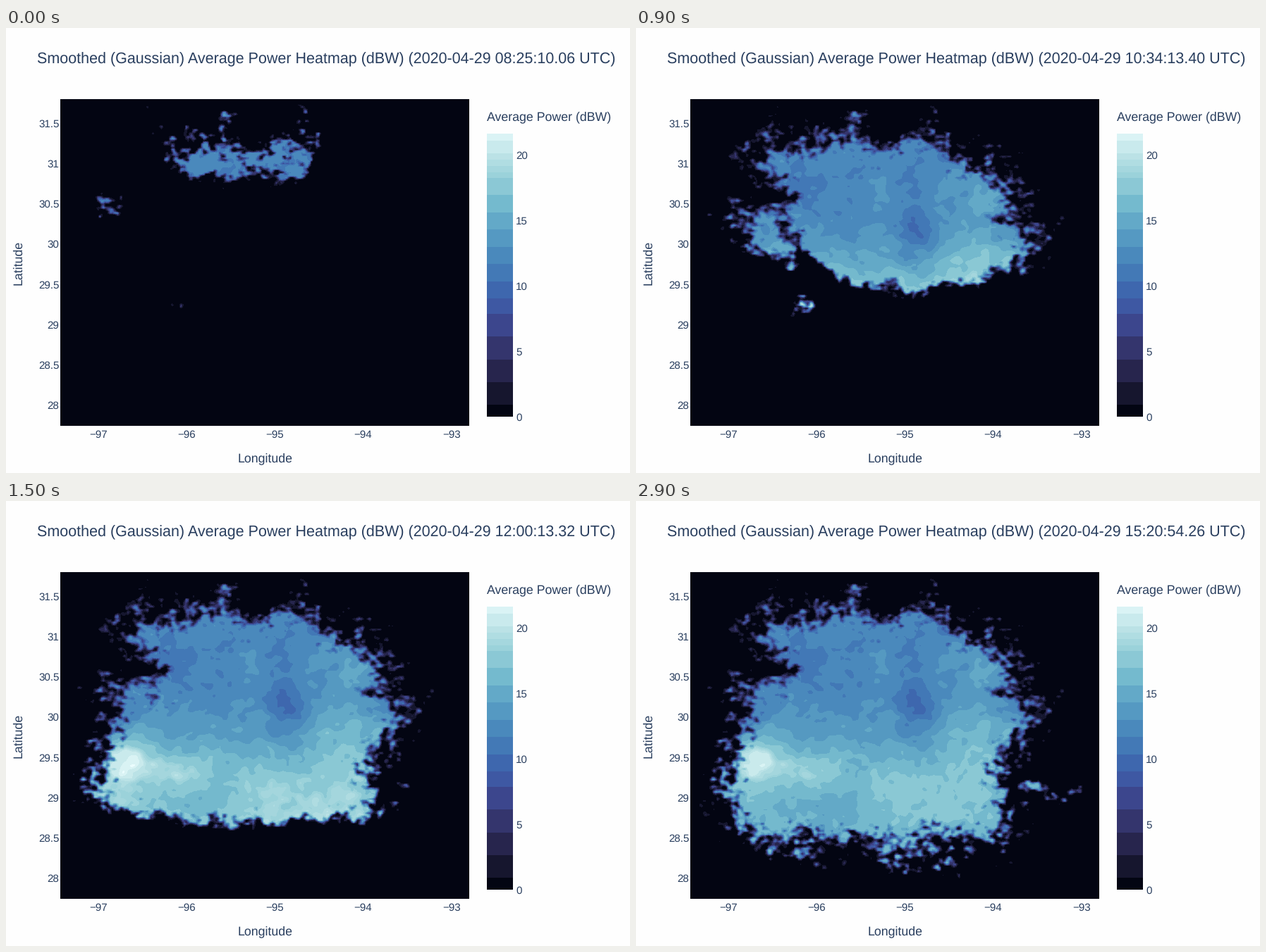
These frames come from a looping animation (885x632 px, 3 s). A matplotlib script:

```python
import numpy as np
import matplotlib.pyplot as plt
from matplotlib.animation import FuncAnimation
from matplotlib.colors import BoundaryNorm, LinearSegmentedColormap, ListedColormap
from matplotlib.path import Path

W, H, DPI = 885, 632, 100
FRAMES, INTERVAL = 30, 100
LEFT, RIGHT, TOP, BOTTOM = 77, 657, 101, 565
NX, NY = 232, 185
INK = "#2a3f5f"

plt.rcParams["font.family"] = "Liberation Sans"
plt.rcParams["text.hinting"] = "none"
rng = np.random.default_rng(29)

x, y = np.meshgrid(
    LEFT + (np.arange(NX) + 0.5) * (RIGHT - LEFT) / NX,
    TOP + (np.arange(NY) + 0.5) * (BOTTOM - TOP) / NY,
)


def noise(sx, sy):
    """Gaussian-smoothed white noise with unit deviation."""
    fx, fy = np.meshgrid(np.fft.fftfreq(NX), np.fft.fftfreq(NY))
    kernel = np.exp(-2 * np.pi**2 * ((sx * fx) ** 2 + (sy * fy) ** 2))
    n = np.fft.ifft2(np.fft.fft2(rng.normal(size=(NY, NX))) * kernel).real
    return n / n.std()


def radius2(cx, cy, rx, ry, turn=0):
    """Squared distance from an ellipse centre, 1 on its rim."""
    c, s = np.cos(np.radians(turn)), np.sin(np.radians(turn))
    u, v = (x - cx) * c + (y - cy) * s, (y - cy) * c - (x - cx) * s
    return (u / rx) ** 2 + (v / ry) ** 2


def smoothstep(v):
    v = np.clip(v, 0, 1)
    return v * v * (3 - 2 * v)


def ramp(step, start, end):
    return np.clip((step - start) / (end - start), 0, 1)


def signed_distance(points):
    """Distance to a closed outline in pixels, positive inside."""
    pts = np.array(points, float)
    best = np.full(x.shape, 1e9)
    for (px, py), (qx, qy) in zip(pts, np.roll(pts, -1, axis=0)):
        dx, dy = qx - px, qy - py
        s = np.clip(((x - px) * dx + (y - py) * dy) / (dx * dx + dy * dy), 0, 1)
        best = np.minimum(best, np.hypot(x - px - s * dx, y - py - s * dy))
    inside = Path(pts).contains_points(np.c_[x.ravel(), y.ravel()])
    return np.where(inside.reshape(x.shape), best, -best)


# Extent of the storm once it has fully passed
OUTLINE = [
    (165, 168), (188, 150), (212, 168), (242, 160), (298, 132), (345, 160),
    (405, 150), (455, 178), (505, 196), (535, 222), (528, 260), (558, 285),
    (550, 325), (522, 375), (522, 460), (490, 490), (375, 508), (310, 486),
    (180, 493), (145, 470), (122, 385), (150, 310), (138, 280), (205, 236),
]
outline = signed_distance(OUTLINE)
outline *= np.where(outline < 0, 0.3, 0.5)

# Detached cells: centre, radii, first step, strength
CELLS = [
    (150, 250, 34, 16, 0, -4), (205, 267, 33, 12, 2, 7),
    (176, 313, 17, 11, 2, 7), (235, 390, 20, 17, 10, 15),
    (550, 405, 26, 12, 25, 2), (612, 418, 38, 14, 25, -4),
]

# Gaps: centre, radii, turn, depth, step when filled (None stays open)
GAPS = [
    (247, 340, 58, 17, 58, 45, 17), (312, 377, 11, 9, 0, 34, 19),
    (202, 240, 26, 8, 0, 18, None), (228, 288, 32, 14, 0, 12, None),
    (460, 244, 13, 7, 0, 13, None),
]

# Lasting highs and lows of the average power: centre, radii, dBW
BUMPS = [
    (165, 365, 34, 30, 4.6), (220, 380, 48, 25, 2.2), (400, 410, 80, 50, 1),
    (490, 340, 50, 65, 1.8), (495, 235, 35, 40, 2.3), (240, 220, 35, 40, -1.3),
    (395, 290, 24, 70, -2.4), (260, 440, 60, 30, -1.2),
]

edge_noise = 4 * noise(1.0, 0.75) + 2.8 * noise(2.2, 1.7) + 1.6 * noise(6, 6)
wiggle = 5 * noise(5, 5)

power = 12.3 + 4 * smoothstep((y - 270) / 130)
power += 0.35 * noise(1.6, 1.3) + 0.3 * noise(6, 6)
for *shape, gain in BUMPS:
    power += gain * np.exp(-radius2(*shape))
young_cell = np.exp(-radius2(500, 238, 32, 32))


def front(step):
    """Southern edge: eases south, bowed, widening from a narrow start."""
    base = 212 + 295 * np.sin(np.pi / 2 * min(step / 22, 1)) ** 1.2
    bow = 25 * ((x - 350) / 180) ** 2
    centre, half = 330 + 10 * min(step, 3), 95 + 27 * step
    sides = 2 * np.maximum(abs(x - centre) - half, 0)
    lag = 0.9 * np.maximum(235 - x, 0) * max(1 - abs(step - 11) / 4, 0)
    return base - bow - sides - lag + wiggle


def field(step):
    ahead = front(step) - y
    cover = np.minimum(outline, ahead * (1 - 0.6 * ramp(step, 15, 23)))
    cover = cover - 5 * (1 - ramp(step, 0, 3))
    for *shape, depth, filled in GAPS:
        gap = 1 if filled is None else 1 - ramp(step, filled - 5, filled)
        cover -= depth * gap * np.exp(-radius2(*shape))
    for *shape, birth, strength in CELLS:
        late = 30 * (1 - ramp(step, birth - 2, birth))
        cover = np.maximum(cover, strength - late - 8 * radius2(*shape))
    rough = 1.5 - 0.5 * ramp(step, 0, 3)
    cover = smoothstep((cover + rough * edge_noise + 3) / 14)
    fresh = 2.5 * ramp(step, 3, 10) * (1 - ramp(step, 15, 23))
    level = power + fresh * np.exp(-np.maximum(ahead, 0) / 45)
    level += 2 * (1 - ramp(step, 3, 7)) * young_cell
    return np.maximum(level * cover, 0)


def clock(step):
    keys = [0, 3, 7, 11, 15, 23, 29]
    times = [30310.06, 32893.27, 36333.42, 39773.38, 43213.32, 50082.31, 55254.26]
    cs = int(round(np.interp(step, keys, times) * 100))
    s, cs = divmod(cs, 100)
    return f"{s // 3600:02d}:{s // 60 % 60:02d}:{s % 60:02d}.{cs:02d}"


def title(step):
    return ("Smoothed (Gaussian) Average Power Heatmap (dBW) "
            f"(2020-04-29 {clock(step)} UTC)")


ICE = [(3, 5, 18), (25, 25, 51), (44, 42, 87), (58, 60, 125), (62, 83, 160),
       (62, 109, 178), (72, 134, 187), (89, 159, 196), (114, 184, 205),
       (149, 207, 216), (192, 229, 232), (234, 252, 253)]
ice = LinearSegmentedColormap.from_list("ice", np.array(ICE) / 255)

# Colour bands get narrower towards the bright end
BAR = np.r_[552, np.linspace(535, 406, 5), np.linspace(384, 213, 8),
            np.linspace(205, 178, 4), 160, 149.5]
levels = (552.5 - BAR) / 18.62
bands = ice((levels[1:] + levels[:-1]) / 2 / 22.2)
bands[0] = ice(0.0)
cmap = ListedColormap(np.vstack([bands, ice(1.0)]))
norm = BoundaryNorm(np.r_[-1, levels[1:], 40], cmap.N)

fig = plt.figure(figsize=(W / DPI, H / DPI), dpi=DPI, facecolor="#fefefe")
ax = fig.add_axes([0, 0, 1, 1])
ax.axis("off")


def label(px, py, text, size=15.17, **kw):
    kw.setdefault("va", "baseline")
    return ax.text(px, py, text, fontsize=size * 72 / DPI, color=INK, **kw)


image = ax.imshow(field(0), cmap=cmap, norm=norm, interpolation="bilinear",
                  interpolation_stage="data", aspect="auto",
                  extent=(LEFT, RIGHT, BOTTOM, TOP))
ax.bar(700.5, np.diff(BAR), 37, bottom=BAR[:-1], color=bands,
       linewidth=0, antialiased=False)
ax.set_xlim(0, W)
ax.set_ylim(H, 0)

heading = label(44.2, 50.7, title(0), 21.54)
for i in range(8):
    label(75.5, 140.4 + 57.27 * i, f"{31.5 - 0.5 * i:g}", ha="right")
for i in range(5):
    label(131 + 125.15 * i, 581.6, f"\u2212{97 - i}", ha="center")
    label(723, 557.9 - 93.1 * i, f"{5 * i}")
label(367.3, 616, "Longitude", 17.7, ha="center")
label(22, 333, "Latitude", 17.7, ha="center", rotation=90, rotation_mode="anchor")
label(682, 131.3, "Average Power (dBW)", 17.7)


def update(step):
    image.set_data(field(step))
    heading.set_text(title(step))
    return image, heading


anim = FuncAnimation(fig, update, frames=FRAMES, interval=INTERVAL,
                     repeat=True, repeat_delay=0)
plt.show()
```
